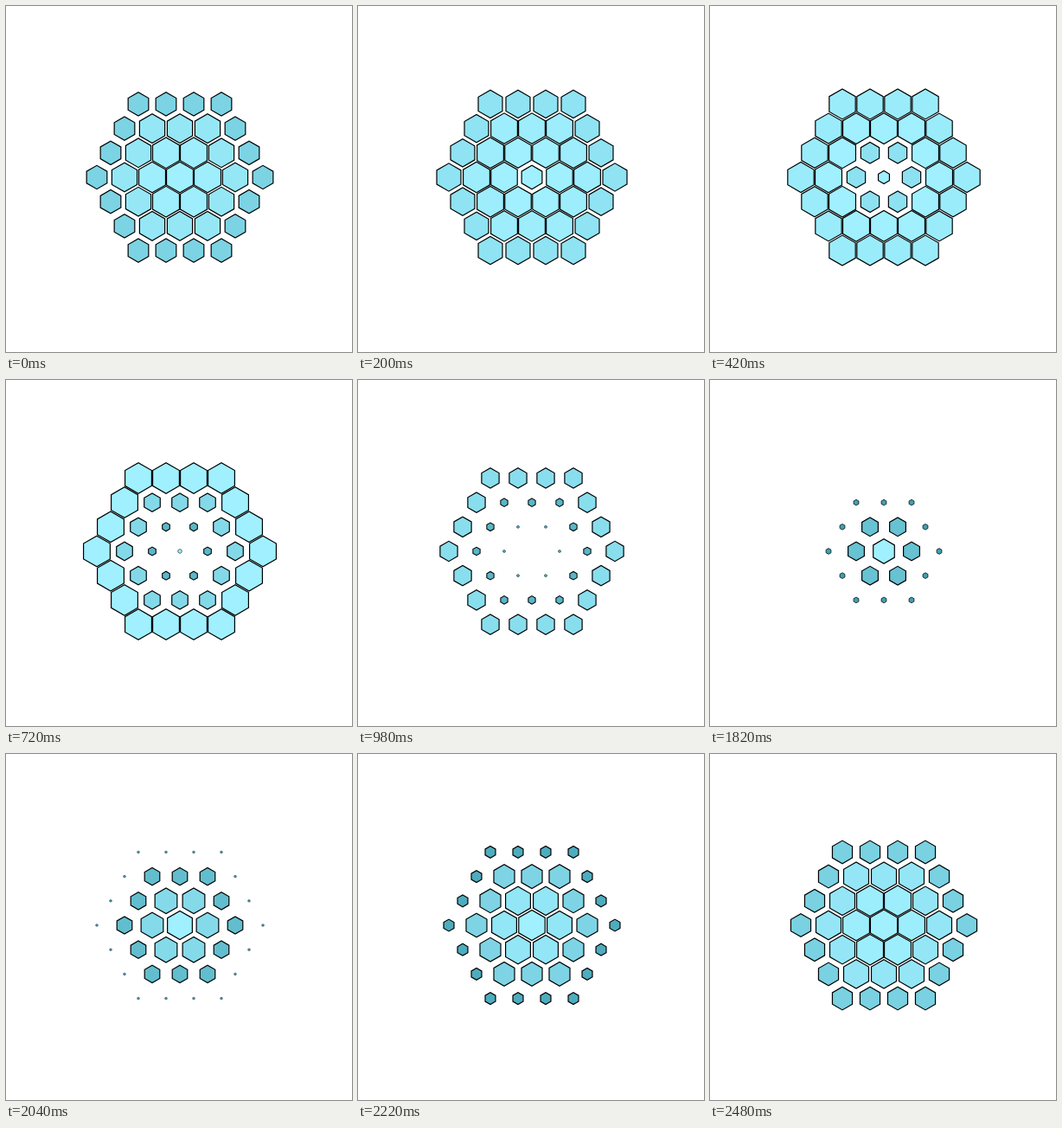
An HTML page with a canvas that plays this animation: 400x400 px, repeating every 2500 ms.

```html
<!DOCTYPE html>
<html lang="en">
<head>
<meta charset="utf-8">
<title>Pulsing honeycomb</title>
<style>
  html, body { margin: 0; width: 100%; height: 100%; overflow: hidden; background: #fff; }
  canvas { display: block; }
</style>
</head>
<body>
<canvas id="stage" width="400" height="400"></canvas>
<script>
const ctx = document.getElementById('stage').getContext('2d');
const LOOP = 2500, HALF = LOOP / 2;
const CENTER = { x: 201, y: 198 }, PITCH = 32, ROW = 28.2, WIDTH = 30;
const OUTLINE = 1.2; // two outlines together fill the gap between full cells
const DELAYS = [-25, 150, 398, 690]; // per ring, from the middle outwards
const FADE_LAG = 85;
const LIGHT = [160, 240, 255], DARK = [56, 156, 174];

// Same curve as CSS "ease": cubic-bezier(.25, .1, .25, 1)
function ease(x) {
  let lo = 0, hi = 1;
  for (let i = 0; i < 24; i++) {
    const u = (lo + hi) / 2;
    if (0.75 * u * (1 - u) + u ** 3 < x) lo = u; else hi = u;
  }
  return 0.3 * lo * (1 - lo) ** 2 + 3 * lo * lo * (1 - lo) + lo ** 3;
}

// 1 -> 0 -> 1 over one loop, eased in each half
function pulse(time) {
  const p = ((time % LOOP) + LOOP) % LOOP;
  return p < HALF ? 1 - ease(p / HALF) : ease(p / HALF - 1);
}

function mix(amount) {
  return `rgb(${DARK.map((d, i) => Math.round(d + (LIGHT[i] - d) * amount))})`;
}

function hexagon(x, y, width, fill) {
  const line = Math.min(OUTLINE, width / 7);
  const radius = (width + line) / Math.sqrt(3);
  ctx.beginPath();
  for (let i = 0; i < 6; i++) {
    const a = (i + 0.5) * Math.PI / 3;
    ctx.lineTo(x + radius * Math.cos(a), y + radius * Math.sin(a));
  }
  ctx.closePath();
  ctx.fillStyle = fill;
  ctx.fill();
  ctx.lineWidth = line;
  ctx.strokeStyle = '#000';
  ctx.stroke();
}

const cells = [];
for (let r = -3; r <= 3; r++) {
  for (let q = -3; q <= 3; q++) {
    const ring = Math.max(Math.abs(q), Math.abs(r), Math.abs(q + r));
    if (ring <= 3) {
      cells.push({ x: CENTER.x + (q + r / 2) * PITCH, y: CENTER.y + r * ROW, ring });
    }
  }
}

function draw(time) {
  ctx.fillStyle = '#fff';
  ctx.fillRect(0, 0, 400, 400);
  const rings = DELAYS.map((delay, i) => ({
    width: WIDTH * (0.01 + 0.99 * pulse(time - delay)),
    fill: mix(i ? pulse(time - delay - FADE_LAG) : 1)
  }));
  for (const { x, y, ring } of cells) {
    const { width, fill } = rings[ring];
    if (width > 1.2) hexagon(x, y, width, fill);
  }
}

const start = performance.now();
function frame() {
  draw(performance.now() - start);
  requestAnimationFrame(frame);
}
frame();
</script>
</body>
</html>
```
